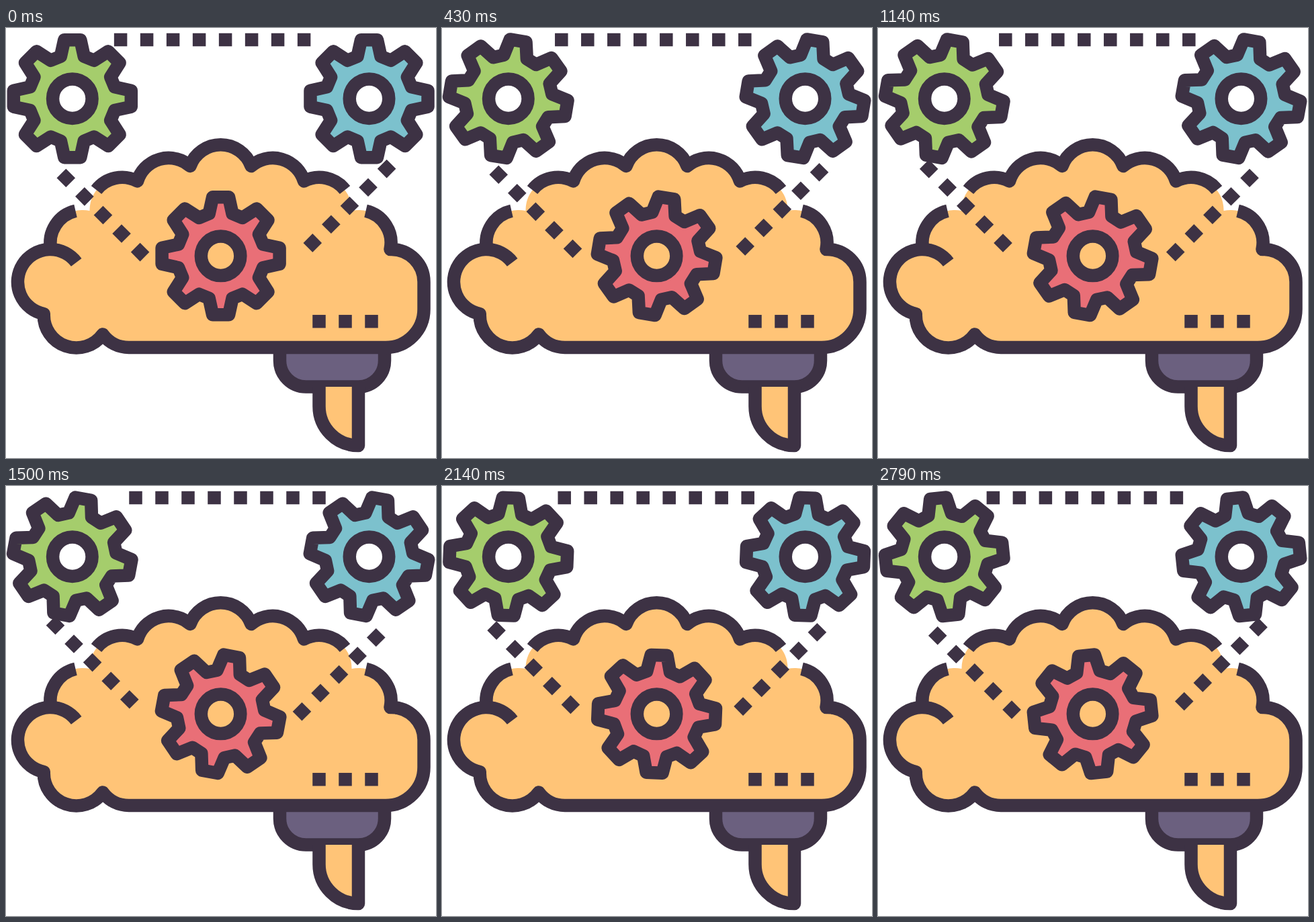
Write an HTML page that moves like this. It is 640 px wide and 640 px high and loops after 2.87 s.

```html
<!DOCTYPE html>
<html lang="en">
<head>
<meta charset="utf-8">
<title>Thinking gears</title>
<style>
  html, body { margin: 0; width: 100%; height: 100%; overflow: hidden; background: #fff; }
  svg { display: block; width: 100vw; height: 100vh; }
  .line { fill: none; stroke: #3d3244; stroke-width: 19.5; stroke-linejoin: round; }
  .dot { fill: #3d3244; }
</style>
</head>
<body>
<svg id="stage" viewBox="0 0 640 640"></svg>
<script>
const LOOP = 2870;   // ms until the picture repeats
const FPS = 14;
const CYCLE = 2833;  // ms for one turn of the gears
const SLIDE = 23.8;  // farthest travel of the dotted lines
const SKIN = '#ffc477';

const stage = document.getElementById('stage');

function add(tag, attrs, parent = stage) {
  const el = document.createElementNS('http://www.w3.org/2000/svg', tag);
  for (const name in attrs) el.setAttribute(name, attrs[name]);
  return parent.appendChild(el);
}

// Chain of lobes: arcs of one radius through the given points
const lobes = (sweep, ...points) =>
  points.map(([x, y]) => `A48.5 48.5 0 0 ${sweep} ${x} ${y}`).join('');

const line = (d, fill = 'none') => add('path', { class: 'line', d, style: `fill:${fill}` });

function drawBrain() {
  const crown = [[195.5, 228], [274, 205.5], [365, 205.5], [443.5, 228]];
  add('path', {
    fill: SKIN,
    d: 'M67 329.5' + lobes(1, [124.5, 272], ...crown, [514.5, 272], [572, 329.5]) +
       'H573.5' + lobes(1, [622, 378]) + 'V418.5A57 57 0 0 1 565 475.5H183' +
       lobes(1, [144, 456], [56.3, 425.5], [67, 329.5]) + 'Z'
  });
  line('M407.5 475.5V495A39 39 0 0 0 446.5 534H524.5A39 39 0 0 0 563.5 495V475.5', '#6b607f');
  line('M466 534V563A58.5 58.5 0 0 0 524.5 621.5V534', SKIN);
  line('M134.5 241' + lobes(1, ...crown, [504.5, 241]));
  line('M103.5 272.3' + lobes(0, [67, 329.5]));
  line('M104.7 348.8A48.5 48.5 0 1 0 56.3 425.5' + lobes(0, [144, 456], [183, 475.5]) +
       'H565A57 57 0 0 0 622 418.5V378' + lobes(0, [573.5, 329.5]) +
       'H572' + lobes(0, [535.5, 272.3]));
}

function gearPath() {
  const tooth = [[-17.4, -63], [-12, -87.5], [12, -87.5], [17.4, -63]];
  const points = [];
  for (let i = 0; i < 8; i++) {
    const c = Math.cos(i * Math.PI / 4), s = Math.sin(i * Math.PI / 4);
    for (const [x, y] of tooth) {
      points.push((x * c - y * s).toFixed(2) + ' ' + (x * s + y * c).toFixed(2));
    }
  }
  return 'M' + points.join('L') + 'Z';
}

function makeGear(x, y, color, hole) {
  const g = add('g', { transform: `translate(${x} ${y})` });
  const wheel = add('path', { class: 'line', d: gearPath(), style: `fill:${color}` }, g);
  add('circle', { class: 'line', r: 29.25, style: `fill:${hole}` }, g);
  return wheel;
}

// Row of squares laid along the x axis of a turned group
function makeDots(x, y, angle, count) {
  const g = add('g', { transform: `translate(${x} ${y}) rotate(${angle})` });
  const row = add('g', {}, g);
  for (let i = 0; i < count; i++) {
    add('rect', { class: 'dot', x: i * 39 - 9.75, y: -9.75, width: 19.5, height: 19.5 }, row);
  }
  return row;
}

drawBrain();
makeDots(466, 436.7, 0, 3);
const gears = [
  makeGear(98.8, 105.2, '#a5cd6c', '#fff'),
  makeGear(540.5, 105.2, '#7cc1cd', '#fff'),
  makeGear(319.6, 339.3, '#e96f77', SKIN)
];
const rows = [
  makeDots(170.6, 17.5, 0, 8),
  makeDots(566.6, 209.6, 135, 5),
  makeDots(199.6, 333.6, 225, 5)
];

// Steps fall on the frame rate, rounded to 10 ms
const stepStart = k => Math.round(k * 100 / FPS) * 10;

function stepAt(t) {
  const k = Math.floor(t * FPS / 1000) + 1;
  return Math.min(39, stepStart(k) <= t ? k : stepStart(k - 1) <= t ? k - 1 : k - 2);
}

function draw(t) {
  const phase = stepAt(t % LOOP) * 1000 / FPS / CYCLE;
  const shift = SLIDE * (1 - Math.abs(1 - 2 * phase));
  for (const gear of gears) gear.setAttribute('transform', `rotate(${360 * phase})`);
  for (const row of rows) row.setAttribute('transform', `translate(${shift} 0)`);
}

let start;
function tick(now) {
  start ??= now;
  draw(now - start);
  requestAnimationFrame(tick);
}
draw(0);
requestAnimationFrame(tick);
</script>
</body>
</html>
```
